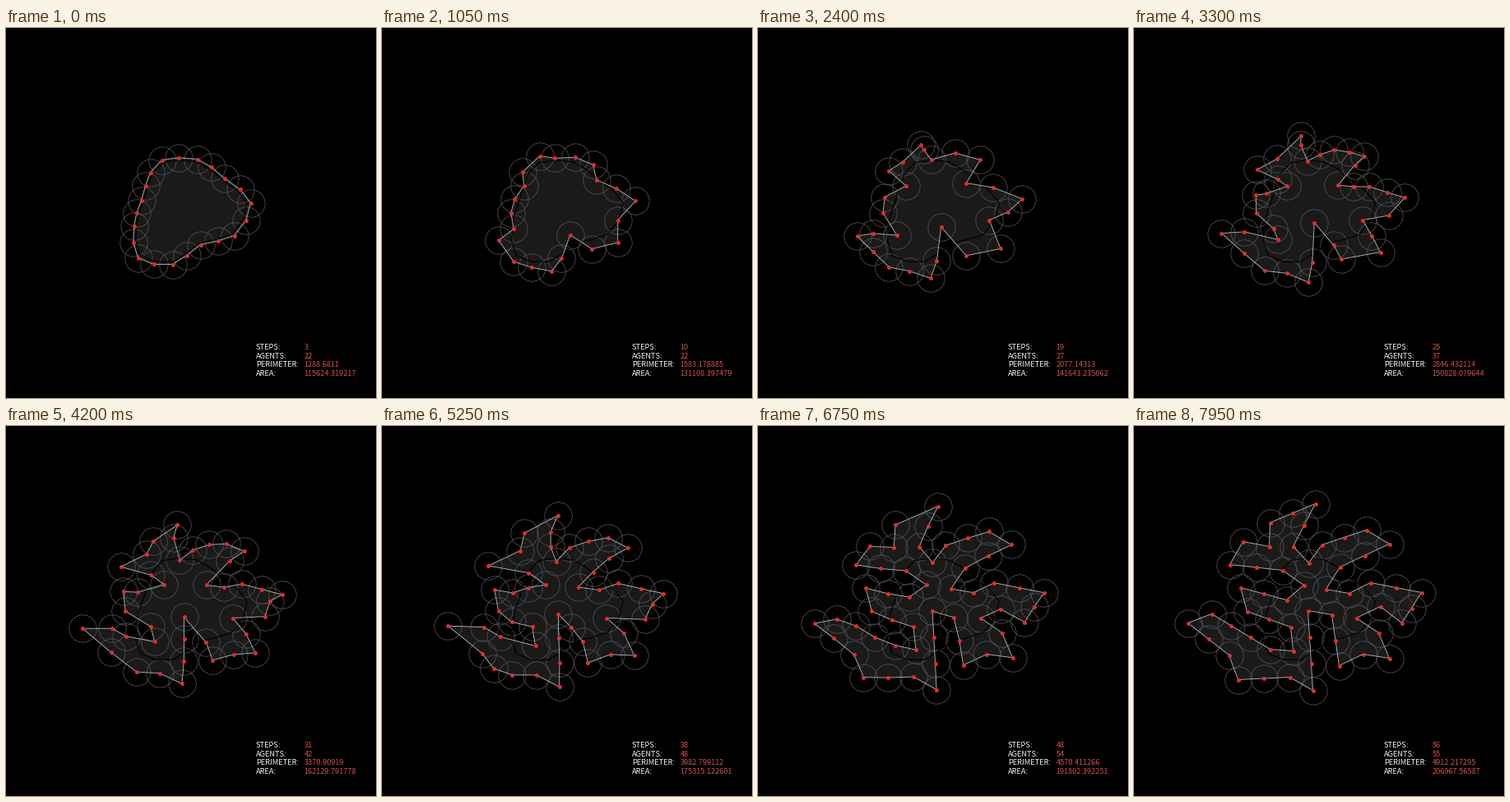
A matplotlib script that plays this animation: 450 by 450 pixels, repeating every 8000 ms.

```python
import numpy as np
import matplotlib.pyplot as plt
from matplotlib.animation import FuncAnimation

SIZE, DPI = 450, 100
FRAME_MS, FRAMES_PER_STEP, FRAMES = 50, 3, 160
FIRST_STEP, LAST_STEP = 3, 56
RADIUS = 16.7
SPACING = 30
FONT = "Noto Sans CJK JP"

# Counter values at a few steps: step, agents, perimeter, area
STATS = np.array([
    (3, 22, 1288.6811, 115624.319217),
    (10, 22, 1583.178885, 131108.397479),
    (19, 27, 2077.14313, 141643.235062),
    (25, 37, 2846.432114, 150828.079644),
    (38, 48, 3982.799112, 175315.122601),
    (48, 54, 4570.411266, 191802.392251),
    (56, 55, 4912.217295, 206967.56587)])

BLOB = np.array([
    (190, 161), (233, 160), (266, 183), (298, 213), (278, 253), (237, 264),
    (203, 288), (161, 280), (156, 241), (165, 210), (176, 176)], float)

# Corners of the grown colony
CORNERS = np.array([
    (221, 95), (194, 147), (213, 167), (229, 145), (283, 127), (311, 144), (251, 172),
    (234, 199), (262, 204), (288, 191), (350, 203), (338, 222), (326, 240), (300, 220),
    (271, 234), (298, 252), (311, 283), (279, 278), (250, 292), (241, 230), (212, 225),
    (218, 322), (190, 306), (127, 309), (116, 279), (66, 240), (95, 229), (166, 272),
    (194, 274), (191, 245), (138, 226), (130, 197), (186, 212), (207, 194), (181, 176),
    (117, 169), (133, 141), (165, 147), (166, 118)], float)

# Agents added between each first agent and the next
NEWCOMERS = [2, 1, 1, 2, 1, 1, 3, 1, 1, 2, 1, 0, 0, 0, 3, 4, 2, 0, 2, 2, 4]


def px(value):
    return value * 72 / DPI


def smooth_double(points):
    """Insert a curved midpoint on every edge of a closed outline."""
    around = [np.roll(points, -k, axis=0) for k in (-1, 0, 1, 2)]
    middle = (9 * (around[1] + around[2]) - around[0] - around[3]) / 16
    return np.stack([points, middle], axis=1).reshape(-1, 2)


def subdivide(corners):
    """Place agents evenly along every edge."""
    points = []
    for p, q in zip(corners, np.roll(corners, -1, axis=0)):
        n = max(1, round(np.hypot(*(q - p)) / SPACING))
        points += [p + (q - p) * k / n for k in range(n)]
    return np.array(points)


SEED = smooth_double(BLOB)[:-1]
GROWN = subdivide(CORNERS)
SLOTS = np.cumsum([0] + [n + 1 for n in NEWCOMERS[:-1]])
CENTER = SEED.mean(axis=0)

# The lower right side grows early, the upper left side late
angle = np.arctan2(*(SEED - CENTER).T[::-1])
PACE = 1.2 - 0.45 * np.cos(angle - np.radians(55))


def first_agents(step):
    u = (step - FIRST_STEP) / (LAST_STEP - FIRST_STEP)
    ease = np.sin(np.pi / 2 * u) ** PACE
    return SEED + ease[:, None] * (GROWN[SLOTS] - SEED)


def birth_steps():
    """Every gap fills from its middle; the widest gaps go first."""
    queue = []
    for gap, count in enumerate(NEWCOMERS):
        places = sorted(range(1, count + 1), key=lambda p: abs(p - (count + 1) / 2))
        queue += [(rank, -count, gap, place) for rank, place in enumerate(places)]
    births = {}
    for order, (_, _, gap, place) in enumerate(sorted(queue), 1):
        agents = STATS[0, 1] + order
        births[gap, place] = int(np.ceil(np.interp(agents, STATS[1:, 1], STATS[1:, 0])))
    return births


BIRTHS = birth_steps()


def outline_at(step):
    now, end = first_agents(step), first_agents(LAST_STEP)
    points = []
    for gap, count in enumerate(NEWCOMERS):
        after = (gap + 1) % len(SEED)
        points.append(now[gap])
        for place in range(1, count + 1):
            birth = BIRTHS[gap, place]
            if step < birth:
                continue
            f = place / (count + 1)
            grown = np.sin(np.pi / 2 * (step - birth + 1) / (LAST_STEP - birth + 1))
            bulge = GROWN[SLOTS[gap] + place] - ((1 - f) * end[gap] + f * end[after])
            points.append((1 - f) * now[gap] + f * now[after] + grown * bulge)
    return np.array(points)


def number(value):
    return f"{value:.6f}".rstrip("0").rstrip(".")


fig = plt.figure(figsize=(SIZE / DPI, SIZE / DPI), dpi=DPI, facecolor="black")
ax = fig.add_axes([0, 0, 1, 1])
ax.set(xlim=(0.5, SIZE + 0.5), ylim=(SIZE + 0.5, 0.5))
ax.axis("off")

body = plt.Polygon(SEED, fc="#1a1a1a", ec="none", zorder=1)
ax.add_patch(body)
circles, = ax.plot([], [], "o", ms=px(2 * RADIUS), mfc="none", mec="#525252",
                   mew=px(0.8), snap=False, zorder=2)
core = CENTER + 0.95 * (SEED - CENTER)
ax.add_patch(plt.Polygon(core, fc="none", ec="black", lw=px(1.2), joinstyle="round", zorder=3))
outline, = ax.plot([], [], color="#b4b4b4", lw=px(0.9), zorder=4)
dots, = ax.plot([], [], "o", ms=px(5), mfc="#e02d2d", mec="none", snap=False, zorder=5)

values = []
for row, label in enumerate(["STEPS:", "AGENTS:", "PERIMETER:", "AREA:"]):
    y = 391.5 + 10.7 * row
    ax.text(304.5, y, label, color="#f0f0f0", family=FONT, size=px(9.3))
    values.append(ax.text(363.2, y, "", color="#d0524c", family=FONT, size=px(9.2)))


def update(frame):
    step = FIRST_STEP + frame // FRAMES_PER_STEP
    points = outline_at(step)
    closed = np.vstack([points, points[:1]])
    body.set_xy(closed)
    outline.set_data(*closed.T)
    circles.set_data(*points.T)
    dots.set_data(*points.T)
    perimeter, area = (np.interp(step, STATS[:, 0], STATS[:, k]) for k in (2, 3))
    texts = [str(step), str(len(closed)), number(perimeter), number(area)]
    for text, value in zip(values, texts):
        text.set_text(value)
    return [body, circles, outline, dots, *values]


anim = FuncAnimation(fig, update, frames=FRAMES, interval=FRAME_MS, repeat=True,
                     repeat_delay=0, init_func=lambda: update(0))
plt.show()
```
